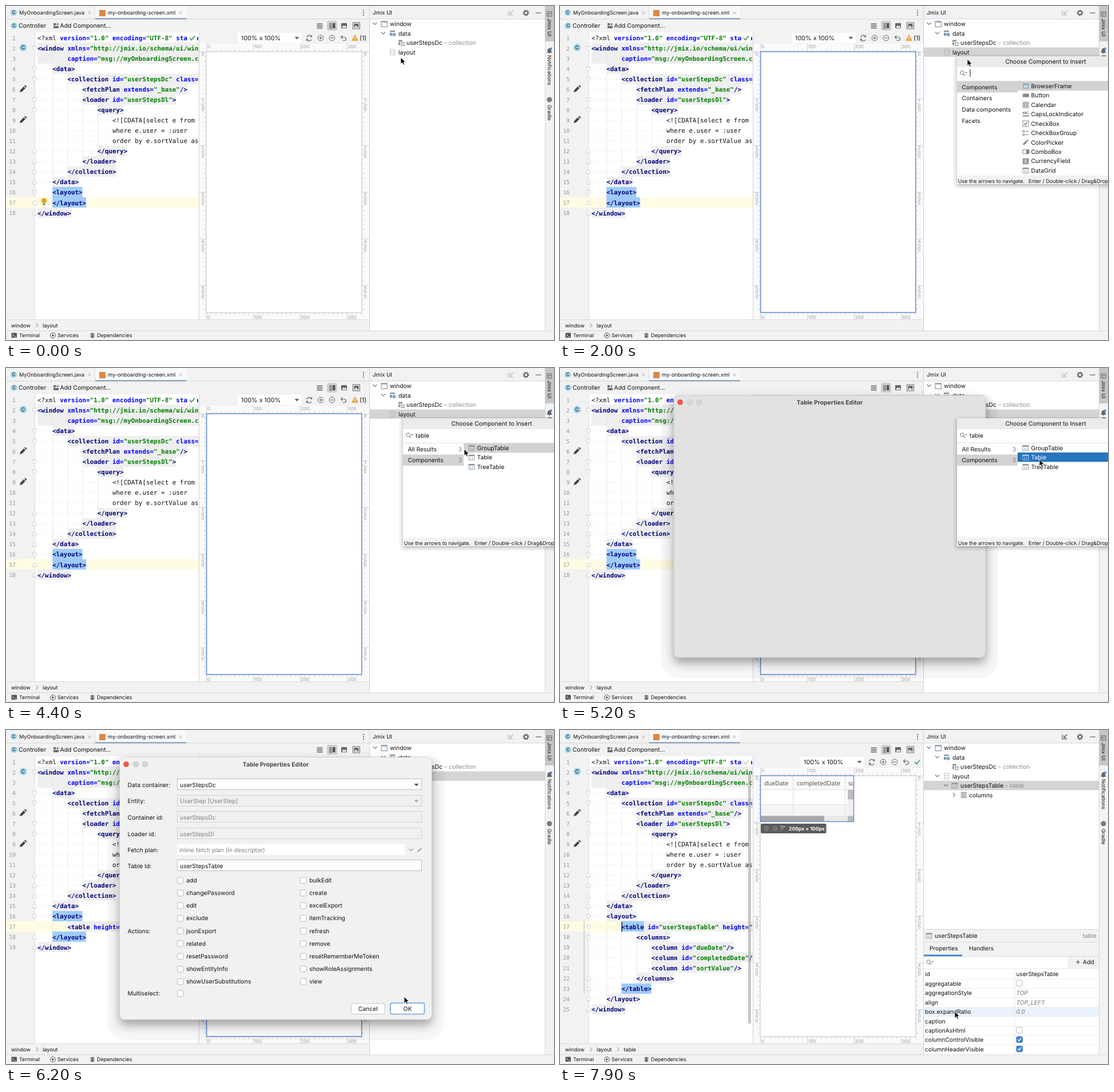
Recreate the animation shown at these times as an HTML page. Size 958 px wide and 585 px high, loop 8 s.

```html
<!DOCTYPE html>
<html lang="en">
<head>
<meta charset="utf-8">
<title>Screen designer</title>
<style>
html, body { margin: 0; width: 100%; height: 100%; overflow: hidden; background: #fff; }
svg { display: block; width: 100vw; height: 100vh; }
text { font-family: Inter, "Liberation Sans", sans-serif; fill: #111; white-space: pre; text-rendering: geometricPrecision; }
.code { font-family: "DejaVu Sans Mono", monospace; font-size: 10.88px; }
.b { font-weight: 700; }
.mid { text-anchor: middle; }
.end { text-anchor: end; }
.dim { fill: #808080; }
.white { fill: #fff; }
.it { font-style: italic; fill: #777; }
.tick { font-size: 8px; fill: #999; }
.web { font-family: "Open Sans", sans-serif; fill: #444; }
</style>
</head>
<body>
<svg id="stage" viewBox="0 0 958 585" xmlns="http://www.w3.org/2000/svg"></svg>
<script>
const LOOP = 8000, CH = 6.55, ROW = 18.05;
const esc = s => s.replace(/&/g, '&amp;').replace(/</g, '&lt;');
// y is the vertical middle of the capitals
const T = (x, y, s, size = 10.4, cls = '') =>
  `<text x="${x}" y="${y + size * 0.36}" font-size="${size}" class="${cls}">${esc(s)}</text>`;
const R = (x, y, w, h, fill, more = '') =>
  `<rect x="${x}" y="${y}" width="${w}" height="${h}" fill="${fill}" ${more}/>`;
const P = (d, stroke = '#6e6e6e', w = 1.2, fill = 'none') =>
  `<path d="${d}" stroke="${stroke}" stroke-width="${w}" fill="${fill}"/>`;
const C = (x, y, r, fill, more = '') => `<circle cx="${x}" cy="${y}" r="${r}" fill="${fill}" ${more}/>`;
const G = (id, s) => `<g id="${id}">${s}</g>`;
const at = (x, y, s) => `<g transform="translate(${x} ${y})">${s}</g>`;
const map = (list, f) => list.map(f).join('');
const range = n => [...Array(n).keys()];

// --- icons ---
const classIcon = (x, y, r) => C(x, y, r, '#9fd3ea') + T(x, y, 'C', r * 1.45, 'mid');
const chevron = (x, y, open = true, c = '#777') =>
  P(open ? `M${x - 3.5} ${y - 2}l3.5 3.5l3.5-3.5` : `M${x - 2} ${y - 3.5}l3.5 3.5l-3.5 3.5`, c, 1.1);
const cross = (x, y) => P(`M${x - 2.5} ${y - 2.5}l5 5m0-5l-5 5`, '#aaa', 0.9);
const lens = (x, y) => C(x, y, 3.3, 'none', 'stroke="#777"') + P(`M${x + 2.4} ${y + 2.4}l2.6 2.6`, '#777') +
  P(`M${x + 5} ${y - 1}h4l-2 2.2z`, 'none', 0, '#777');
const pencil = (x, y, c = '#444', k = 1) => `<g transform="translate(${x} ${y}) scale(${k})">` +
  P('M-6 6l1-4l6-6l3 3l-6 6zM2-5l1.6-1.6l3 3l-1.6 1.6z', 'none', 0, c) + '</g>';
const tableIcon = (x, y, c = '#8a969f') =>
  R(x - 5, y - 4.5, 10, 9, 'none', `stroke="${c}" stroke-width=".9"`) + R(x - 5, y - 4.5, 10, 2.2, c) +
  P(`M${x - 1.7} ${y - 0.5}v3.5m3.4-3.5v3.5`, c, 1);
const winIcon = (x, y) => R(x - 5, y - 5, 10.5, 10, '#fff', 'stroke="#7a8a99"') + R(x - 5, y - 5, 10.5, 2.5, '#9fb4c6');
const dataIcon = (x, y) => R(x - 5, y - 5, 9, 2.5, '#8a949c') + R(x - 5, y - 1, 4, 5, '#8a949c') + C(x + 2.5, y + 2, 3, '#7aa5c9');
const dcIcon = (x, y) => R(x - 5, y - 5, 7, 3, '#8a949c') + R(x - 5, y - 1, 3, 5, '#8a949c') +
  R(x, y, 5, 5, '#fff', 'stroke="#6e7a84"');
const dotted = (x, y) => R(x - 4, y - 5, 8, 10, 'none', 'stroke="#999" stroke-dasharray="1.5 1"') +
  P(`M${x - 4} ${y - 1.5}h8m-8 3.5h8`, '#bbb', 0.8);
const box = (x, y, on) => R(x - 5, y - 5, 10.5, 10.5, on ? '#3d7fd0' : '#fff', `rx="2" stroke="${on ? '#3d7fd0' : '#b8b8b8'}"`) +
  (on ? P(`M${x - 2.5} ${y}l2 2.5l3.8-5`, '#fff', 1.5) : '');

// --- code editor ---
const head = [
  '<?xml version="1.0" encoding="UTF-8" standalone="no"?>',
  '<window xmlns="http://jmix.io/schema/ui/window"',
  '        caption="msg://myOnboardingScreen.caption">',
  '    <data>',
  '        <collection id="userStepsDc" class="com.company.onboarding">',
  '            <fetchPlan extends="_base"/>',
  '            <loader id="userStepsDl">',
  '                <query>',
  '                    <![CDATA[select e from UserStep e',
  '                    where e.user = :user',
  '                    order by e.sortValue asc]]>',
  '                </query>',
  '            </loader>',
  '        </collection>',
  '    </data>',
  '    <layout>'];
const tail = ['    </layout>', '</window>'];
const shortTable = ['        <table height="100px" width="200px"/>'];
const fullTable = [
  '        <table id="userStepsTable" height="100px" width="200px">',
  '            <columns>',
  '                <column id="dueDate"/>',
  '                <column id="completedDate"/>',
  '                <column id="sortValue"/>',
  '            </columns>',
  '        </table>'];

const paint = s => s.replace(/"[^"]*"|[\w:]+=|[^"=]+?(?=\s|$)|\s+/g, m => {
  const c = m[0] === '"' ? '#008000' : m.endsWith('=') ? '#0000ff' : '#000080';
  return `<tspan fill="${c}">${esc(m)}</tspan>`;
});
const lineMid = i => 55.8 + ROW * i;
const lineTop = i => Math.round(lineMid(i) - 9.4);
const band = (x, i, w, fill) => R(x, lineTop(i), w, lineTop(i + 1) - lineTop(i), fill);
const foldDir = s => s.startsWith('</') ? -1 : /^<[a-z]/.test(s) && !s.endsWith('/>') ? 1 : 0;

function codeLine(line, i, marked) {
  const y = lineMid(i), s = line.trimStart(), n = line.length - s.length, x = 55 + n * CH;
  const plain = /^(<!|where|order)/.test(s), prolog = s.startsWith('<?'), tag = !plain && !prolog;
  let out = '';
  if (tag) {
    const x0 = s[0] === '<' ? x : 55;
    out += band(x0, i, x + s.length * CH - x0, '#efefef');
  }
  if (marked) out += band(x, i, s.match(/^<\/?\w+>?/)[0].length * CH, '#9fcbfa');
  if (n) out += `<path d="M57.7 ${y}H${x - 1}" stroke="#c4c4c4" stroke-dasharray="1 ${CH - 1}"/>`;
  for (let k = 4; k < n; k += 4) out += band(55 + k * CH, i, 0.8, '#e0e0e0');
  const body = plain ? esc(s) : prolog ? '&lt;?xml<tspan class="b">' + paint(s.slice(5)) + '</tspan>' : paint(s);
  return out + `<text class="code${tag ? ' b' : ''}" x="${x}" y="${y + 3.9}">${body}</text>`;
}

const foldMark = (dir, y) => dir ? at(50, y, `<path transform="scale(1 ${dir})" d="M-3-3.5h6v4.5l-3 2.8l-3-2.8z"
  fill="#fff" stroke="#c6c6c6" stroke-width=".9"/>`) : '';
const code = (lines, cur, marks) => band(0, cur - 1, 337, '#fffce3') +
  `<g clip-path="url(#editor)">${map(lines, (s, i) => codeLine(s, i, marks.includes(i + 1)))}</g>` +
  map(lines, (s, i) => `<text class="code end" x="17" y="${lineMid(i) + 3.7}" style="font-size:9.8px;fill:#999">${i + 1}</text>` +
    foldMark(foldDir(s.trim()), lineMid(i)));

// --- preview rulers ---
function rulers() {
  const U = 81.9, c = '#c4c4c4';
  let s = R(338, 66, 297, 483, '#fafafa') + R(350, 80, 272, 457, '#fff', `stroke="${c}"`);
  for (const k of range(34)) {
    const x = 350.5 + k * U / 10, big = k % 10 === 0;
    if (x > 622) continue;
    s += R(x, big ? 66 : 76, 0.8, big ? 14 : 4, c) + R(x, 537, 0.8, big ? 12 : 4, c);
    if (big) s += map([71, 545], y => T(x + 1.5, y, k * 10 + '', 8, 'tick'));
  }
  for (const k of range(56)) {
    const y = 80 + k * U / 10, big = k % 10 === 0;
    s += R(big ? 338 : 346, y, big ? 12 : 4, 0.8, c) + R(622, y, big ? 13 : 4, 0.8, c);
    if (big) s += map([344, 628], x => map([...(k * 10 + '')], (d, i) => T(x, y + 4.5 + i * 7.6, d, 8, 'tick mid')));
  }
  return s;
}

const zoomBar = (dx, status) => at(dx, 0,
  R(405, 47, 112, 18, '#fff') + T(411, 56, '100% x 100%', 10.8) + P('M504.5 54h8l-4 4.5z', 'none', 0, '#666') +
  P('M534 53.5a4.3 4.3 0 0 0-8 1.5m0 3a4.3 4.3 0 0 0 8 1M534.5 51v3h-3M525.5 61v-3h3', '#666') +
  map([550, 570], x => C(x, 56, 4.8, 'none', 'stroke="#666"') + P(`M${x - 2.5} 56h5`, '#666')) + P('M550 53.5v5', '#666') +
  P('M588.5 51.5l-3 3l3 3M586 54.5h5.5a2.8 2.8 0 0 1 0 6h-3', '#666')) + status;

// --- window chrome ---
const stripe = (y, s) => `<g transform="translate(950 ${y}) rotate(90)">${T(0, 0, s, 8.9)}</g>`;
const chrome =
  R(0, 0, 958, 585, '#f2f2f2') + R(50, 46, 287, 503, '#fff') + R(50, 46, 0.8, 503, '#d8d8d8') +
  R(636, 23, 306, 526, '#fff') + R(636, 549, 306, 20, '#fff') +
  R(0, 22.5, 942, 0.8, '#d0d0d0') + R(156, 0, 159, 23, '#f8f9fb') + R(156, 21, 159, 2.5, '#94a8c2') +
  R(155, 0, 0.8, 22, '#d8d8d8') +
  classIcon(13.5, 11.5, 5.6) + T(23, 12, 'MyOnboardingScreen.java', 9.1) + cross(146, 12) +
  R(163, 7, 11, 11, '#dd8748') + T(178, 12, 'my-onboarding-screen.xml', 9.2) + cross(305, 12) +
  map([8, 12, 16], y => C(625, y, 1.1, '#555')) +
  classIcon(14, 34.5, 5.6) + T(22, 34.5, 'Controller') +
  R(83, 35, 9, 4, '#6e6e6e') + R(83, 30, 4, 4, '#6e6e6e') + P('M90 29.5v5m-2.5-2.5h5') + T(94.5, 34.5, 'Add Component...') +
  map([0, 1, 2, 3], i => R(543.5, 30.5 + i * 2.6, 10, 1.2, '#555')) +
  R(561, 26, 18, 17, '#cfcfcf', 'rx="3"') + map([0, 1, 2, 3], i => R(565, 30.5 + i * 2.6, 5, 1.2, '#555')) + R(571, 30, 4.5, 9, '#555') +
  R(586, 30, 10, 9, '#666') + P('M587 38l3-4l2 2l1.5-2l2 4z', 'none', 0, '#fff') +
  R(606.5, 29, 12, 11, 'none', 'stroke="#666"') + R(608.5, 31, 8, 7, '#666') + P('M609 37.5l2.5-3l2 1.5l2.5 1.5z', 'none', 0, '#fff') +
  rulers() + R(337, 46, 0.9, 503, '#cfcfcf') + R(635, 0, 0.9, 569, '#cfcfcf') +
  T(641, 12, 'Jmix UI', 9.6) +
  C(909, 12, 3.2, 'none', 'stroke="#666" stroke-width="2"') + C(909, 12, 4.8, 'none', 'stroke="#666" stroke-width="1.4" stroke-dasharray="1.9 1.87"') +
  R(926, 11.5, 10, 1.2, '#666') +
  R(942, 0, 0.8, 569, '#d0d0d0') + R(942.5, 0, 15.5, 62, '#c6c6c6') +
  R(946, 10, 8, 8, 'none', 'stroke="#666"') + P('M946 13h8m-5 0v5', '#666', 1) + stripe(22, 'Jmix UI') +
  P('M946 81.5c2-2 0-7 4-7s2 5 4 7zM949 83h2', '#666', 1, '#666') + C(953, 74.5, 2, '#4a8fd6') + stripe(86, 'Notifications') +
  C(950, 164, 4.5, '#707a80') + stripe(173, 'Gradle') +
  R(0, 549, 635, 0.8, '#d4d4d4') + T(9, 559.5, 'window', 9.2) + chevron(54.5, 559.5, false, '#aaa') + T(64, 559.5, 'layout', 9.3) +
  R(0, 568.5, 958, 0.8, '#cfcfcf') + R(9.5, 572.5, 9.5, 8.5, '#555', 'rx="1"') + P('M11.5 575l2 1.7l-2 1.7m3 .8h3', '#fff', 0.9) +
  T(23, 577, 'Terminal', 8.95) + C(82, 577, 4.5, 'none', 'stroke="#555"') + P('M80.5 574.5l4 2.5l-4 2.5z', 'none', 0, '#555') +
  T(90, 577, 'Services', 9.05) + map([0, 2.5, 5], d => P(`M146.5 ${574.5 + d}l4.5 2.2l4.5-2.2l-4.5-2.2z`, '#f2f2f2', 0.6, '#555')) +
  T(159, 577, 'Dependencies', 9.05);

const gutter = classIcon(30, 72.7, 6.4) + pencil(30, 145) + pencil(30, 199);

// --- component tree ---
const noted = (x, y, s, note) =>
  `<text x="${x}" y="${y + 3.75}" font-size="10.4">${s}<tspan fill="#8c8c8c"> – ${note}</tspan></text>`;
const tree = chevron(645, 31) + winIcon(661, 31.5) + T(671, 31.5, 'window') +
  chevron(659.5, 47.5) + dataIcon(676, 48) + T(686, 48, 'data') +
  dcIcon(691, 64.5) + noted(700, 64.5, 'userStepsDc', 'collection') + dotted(676, 81) + T(686, 81, 'layout');
const arrow = c => P('M887 7.5l-6 6m0-4.5v5h5M878 8v8h8', c, 1.1);

const props = [['id', 'userStepsTable'], ['aggregatable', 0], ['aggregationStyle', 'TOP'], ['align', 'TOP_LEFT'],
  ['box.expandRatio', '0.0'], ['caption', ''], ['captionAsHtml', 0], ['columnControlVisible', 1], ['columnHeaderVisible', 1]];
const inspector = R(636, 349, 306, 219.5, '#f2f2f2') + R(636, 349, 306, 0.8, '#cfcfcf') +
  tableIcon(645, 360.5) + T(655, 360.5, 'userStepsTable', 10.3) + T(938, 360.5, 'table', 10.3, 'end dim') +
  R(636, 371, 306, 0.8, '#d6d6d6') + T(646, 382.5, 'Properties', 10.2) + T(715, 382.5, 'Handlers', 10.2) +
  R(636, 396, 306, 0.8, '#d6d6d6') + R(636, 393.5, 67, 2.8, '#4083c9') +
  R(636, 397, 251, 20, '#fff') + lens(644, 406) + P('M902 406.5h7m-3.5-3.5v7', '#555') + T(914, 406.5, 'Add') +
  R(636, 419, 306, 149.5, '#fff') +
  map(props, ([k, v], i) => {
    const y = 427.7 + i * 16.43;
    return (i === 4 ? R(636, y - 8, 306, 16.4, '#eaf3fc') : '') + R(636, y + 8, 306, 0.7, '#e6e6e6') + T(638, y, k, 10.2) +
      (typeof v === 'number' ? box(803, y - 0.8, v) : T(797.5, y, v, 10.2, i ? 'it' : ''));
  }) + R(794.5, 419, 0.8, 149.5, '#e2e2e2');

const newNode = chevron(659.5, 80.5) + R(636, 89, 306, 16.4, '#d4d4d4') + chevron(674.5, 97) + tableIcon(690, 97.5) +
  noted(700, 97.5, 'userStepsTable', 'table') + chevron(689, 113.5, false) +
  map([702, 705.3, 708.6], x => R(x - 0.5, 109.5, 2.2, 9, 'none', 'stroke="#7a848c" stroke-width=".9"')) + T(715, 114, 'columns');

const rendered = R(351, 80, 162, 80, '#fff') + R(351, 80, 162, 24, '#fafafa') + R(351, 130, 152, 20, '#f5f5f5') +
  T(357, 93, 'dueDate', 10.6, 'web') + T(414, 93, 'completedDate', 10.6, 'web') + T(504, 93, 'sc', 10.6, 'web') +
  R(513, 82, 14, 20, '#fff') + R(351, 104, 162, 0.8, '#d8d8d8') + R(351, 130, 152, 0.8, '#dedede') +
  R(407, 80, 0.8, 70, '#d8d8d8') + R(498, 80, 0.8, 70, '#d8d8d8') +
  R(503, 104, 10, 46, '#f1f1f1') + R(503, 104.5, 10, 17, '#bcbcbc') +
  R(351, 150, 162, 10, '#e8e8e8') + R(351, 150.5, 111, 9.5, '#a8a8a8') + R(503, 150.5, 10, 9.5, '#bcbcbc') +
  R(350.5, 80, 163, 80.5, 'none', 'stroke="#5b8fd6" stroke-width="1.4"') +
  R(351, 164, 114.5, 17, '#5d5b5c', 'rx="2"') + map([361, 376], x => C(x, 172.5, 4.5, '#777')) + P('M358.5 172.5h5m12.5-2.5v5', '#555') +
  R(385, 168, 9, 2.5, '#999') + R(385, 172, 6, 2, '#888') + R(385, 175.5, 2, 2, '#888') + T(400, 172.5, '200px × 100px', 8.6, 'white b');

// --- component chooser ---
const names = ['BrowserFrame', 'Button', 'Calendar', 'CapsLockIndicator', 'CheckBox', 'CheckBoxGroup', 'ColorPicker',
  'ComboBox', 'CurrencyField', 'DataGrid'];
const frameIcon = (x, y) => R(x - 5, y - 4.5, 10, 9, '#9aa5ad') + R(x - 3.5, y - 1.5, 7, 4.5, '#c9dcea');
const calIcon = (x, y) => map(range(9), i => R(x - 5 + i % 3 * 3.8, y - 5 + (i / 3 | 0) * 3.8, 2.7, 2.7, 'none', 'stroke="#888" stroke-width=".8"'));
const listIcons = [frameIcon, (x, y) => R(x - 5, y - 3, 11, 6, '#7d8a94'), calIcon,
  (x, y) => T(x, y - 2, 'ABC', 5.2, 'mid') + R(x - 5, y + 2, 11, 2, '#888'),
  (x, y) => R(x - 5, y - 5, 10, 10, '#fff', 'stroke="#888"') + P(`M${x - 2.5} ${y}l2 2.5l3.5-5`, '#666'),
  (x, y) => map([-3.5, 2.5], d => R(x - 5, y + d - 1, 3, 3, 'none', 'stroke="#888"') + R(x, y + d, 5, 1.2, '#888')),
  (x, y) => pencil(x, y, '#888', 0.8),
  (x, y) => R(x - 5, y - 3.5, 11, 7, '#fff', 'stroke="#888"') + R(x + 1, y - 3.5, 5, 7, '#888'),
  (x, y) => R(x - 5, y - 5, 10.5, 10.5, '#8a949c') + T(x, y, '$', 8.5, 'mid white'), tableIcon];
const rowY = i => 140.2 + i * 16.43;
const rows = (list, sel, blue) => R(800, Math.round(rowY(sel) - 8.6), 158, 16.4, blue ? '#2675bf' : '#d2d2d2') +
  map(list, (s, i) => (list === names ? listIcons[i] : tableIcon)(814, rowY(i), i === sel && blue ? '#a9cdf0' : undefined) +
    T(823.5, rowY(i), s, 10.35, i === sel && blue ? 'white' : ''));
const cats = (list, sel) => R(694, 132 + sel * 19.6, 106, 19.4, '#d2d2d2') + map(list, (s, i) => T(702.5, 141.8 + i * 19.7, s, 10.3));
const hits = ['GroupTable', 'Table', 'TreeTable'];
const popup = R(687, 86, 290, 234, '#000', 'rx="10" opacity=".03"') + R(694, 88, 280, 224, '#fff', 'filter="url(#soft)"') + R(694, 88, 264, 19, '#ebebeb') +
  T(849, 97.5, 'Choose Component to Insert', 10.4, 'mid') + lens(703, 117) + R(694, 131, 264, 0.8, '#d6d6d6') +
  T(716, 118, '', 10.3).replace('<text', '<text id="query"') + G('caret', R(716.5, 111, 1, 13, '#111')) +
  G('catsAll', cats(['Components', 'Containers', 'Data components', 'Facets'], 0)) +
  G('catsHit', cats(['All Results', 'Components'], 1)) + G('catsData', T(702.5, 181.2, 'Data components', 10.3)) +
  G('counts', T(797, 141.8, '3', 10.3, 'end dim') + T(797, 161.5, '3', 10.3, 'end dim')) +
  G('listAll', rows(names, 0)) + G('listHit', rows(hits, 0)) + G('listPick', rows(hits, 1, true)) +
  R(694, 297, 264, 15, '#f2f2f2') + T(695.7, 306.3, 'Use the arrows to navigate.', 9) + T(819, 306.3, 'Enter / Double-click / Drag&Drop to insert', 9);

// --- properties dialog ---
const fields = [['Data container:', 'userStepsDc', 96], ['Entity:', 'UserStep [UserStep]', 124.5], ['Container id:', 'userStepsDc', 153],
  ['Loader id:', 'userStepsDl', 182], ['Fetch plan:', 'inline fetch plan (in descriptor)', 210], ['Table Id:', 'userStepsTable', 238]];
const actions = ['add', 'bulkEdit', 'changePassword', 'create', 'edit', 'excelExport', 'exclude', 'itemTracking', 'jsonExport', 'refresh',
  'related', 'remove', 'resetPassword', 'resetRememberMeToken', 'showEntityInfo', 'showRoleAssignments', 'showUserSubstitutions', 'view'];
const field = ([label, value, y], i) => {
  const on = i % 5 === 0, plan = i === 4, top = Math.floor(y - 9.5) - 0.5;
  return T(212.5, y, label) + R(299.5, top, plan ? 398 : 427, 19, on || plan ? '#fff' : '#f0f0f0', plan ? '' : `stroke="${on ? '#bdbdbd' : '#d0d0d0'}"`) +
    T(plan ? 303 : 304, y, value, 10.4, on ? '' : 'dim') + (i < 2 ? P(`M713.5 ${y - 2}h8l-4 4.5z`, 'none', 0, i ? '#aaa' : '#555') : '');
};
const form = R(199, 48, 545, 459, '#f1f1f1', 'rx="8"') + map(fields, field) + chevron(708, 210, true, '#999') + pencil(723, 210, '#aaa', 0.65) +
  T(212.5, 352, 'Actions:') +
  map(actions, (s, i) => {
    const x = i % 2 ? 519.5 : 304.5, y = 263.2 + (i >> 1) * 22.17;
    return box(x, y, 0) + T(x + 10.7, y, s);
  }) + T(212.5, 461.5, 'Multiselect:') + box(304.5, 461.2, 0) +
  R(603.5, 479, 58.5, 18.5, '#fff', 'rx="3" stroke="#c4c4c4"') + T(632.7, 488.5, 'Cancel', 10.4, 'mid') +
  R(672, 478.3, 59.5, 19.3, '#fff', 'rx="3" stroke="#82aee8" stroke-width="1.9"') + T(702, 488.5, 'OK', 10.4, 'mid');
const dialog = R(177, 46, 589, 497, '#000', 'rx="30" opacity=".03"') +
  R(199, 48, 545, 459, '#e2e2e2', 'rx="8" stroke="#bbb" stroke-width=".8" filter="url(#deep)"') + G('form', form) +
  C(210, 60, 4.9, '#f2564d') + map([227, 243], x => C(x, 60, 4.9, '#d6d6d6', 'stroke="#c2c2c2" stroke-width=".7"')) +
  T(471.5, 59.8, 'Table Properties Editor', 10.4, 'mid b').replace('<text', '<text fill-opacity=".75"');

const shadow = (id, dy, r, a) => `<filter id="${id}" x="-20%" y="-20%" width="140%" height="140%">
  <feDropShadow dx="0" dy="${dy}" stdDeviation="${r}" flood-opacity="${a}"/></filter>`;
const pick = id => document.getElementById(id);

pick('stage').innerHTML = `<defs>${shadow('soft', 2, 3, 0.3)}${shadow('deep', 9, 9, 0.36)}
  <clipPath id="editor">${R(50, 46, 287, 503, '#000')}</clipPath></defs>` + chrome +
  G('codeA', code([...head, ...tail], 17, [16, 17])) +
  G('codeB', code([...head, ...shortTable, ...tail], 17, [16, 18])) +
  G('codeC', code([...head, ...fullTable, ...tail], 17, [17, 23]) + R(107.5, 336, 1.3, 17, '#000') +
    R(329, 78, 5, 436, '#999', 'rx="1" opacity=".55"')) +
  G('change', R(41.5, 335.5, 1.2, 126, '#a9bfd6')) + gutter +
  G('crumb', chevron(102, 559.5, false, '#aaa') + T(111.5, 559.5, 'table', 9.2)) +
  G('bulb', C(66.5, 341, 4.6, '#eda21c') + R(64.5, 346, 4, 2.4, '#777')) +
  R(318, 49, 16, 14, '#fff') + P('M321 56l3.2 3.5l6-7', '#59a869', 2) + G('fade', R(318, 49, 16, 14, '#fff', 'opacity=".6"')) +
  G('zoomA', zoomBar(0, P('M610 50.5l5.5 10h-11z', '#e9a33b', 1, '#efae4c') + R(609.5, 54, 1.1, 3.2, '#fff') + T(618, 56, '(1)', 10.8))) +
  G('zoomB', zoomBar(15, P('M620.5 56l3 3.5l5.5-7', '#59a869', 2))) +
  G('frame', R(350.7, 80, 271, 456.7, 'none', 'stroke="#6a97dc" stroke-width="1.6"')) + G('rendered', rendered) +
  G('selected', R(636, 72.5, 306, 16.4, '#d4d4d4')) + tree + G('arrowOff', arrow('#bbb')) + G('arrowOn', arrow('#555')) +
  G('node', newNode + inspector) + G('dialog', dialog) + G('popup', popup) +
  G('cursor', '<path d="M0 0V11.6L2.7 9.2L4.6 13.3L6.6 12.4L4.8 8.4H8.4Z" fill="#000" stroke="#fff" stroke-width=".9"/>');

// part, first ms, end ms
const cues = [
  ['codeA', 0, 5400], ['codeB', 5400, 7200], ['codeC', 7200, LOOP], ['crumb', 7200, LOOP], ['node', 7200, LOOP],
  ['change', 7300, LOOP], ['fade', 7400, LOOP], ['bulb', 0, 1400], ['selected', 500, 7200], ['frame', 500, 7400],
  ['zoomA', 0, 7400], ['zoomB', 7400, LOOP], ['rendered', 7400, LOOP], ['arrowOff', 0, 7400], ['arrowOn', 7400, LOOP],
  ['popup', 1400, 5400], ['catsAll', 0, 2900], ['catsHit', 2900, LOOP], ['catsData', 2900, 3500], ['counts', 3500, LOOP],
  ['listAll', 0, 3300], ['listHit', 3300, 4800], ['listPick', 4800, LOOP], ['dialog', 5100, 6800], ['form', 5500, LOOP]
].map(([id, a, b]) => [pick(id), a, b]);
const typed = [[2900, 't'], [3000, 'ta'], [3300, 'tab'], [3500, 'tabl'], [3700, 'table']];
const path = [[0, 690, 90], [400, 700, 84], [1100, 704, 84], [1500, 712, 93], [3900, 712, 93], [4400, 801, 142], [4700, 838, 160],
  [5500, 838, 160], [6200, 696, 467], [6500, 697, 483], [6900, 690, 493], [LOOP, 690, 493]];
const cursor = pick('cursor'), query = pick('query'), caret = pick('caret');

function render(t) {
  for (const [node, a, b] of cues) node.style.display = t >= a && t < b ? '' : 'none';
  const text = typed.reduce((s, [from, q]) => t >= from ? q : s, '');
  if (query.textContent !== text) query.textContent = text;
  caret.style.display = !text && t % 1000 < 500 ? '' : 'none';
  const i = path.findIndex(p => p[0] > t);
  const [t0, x0, y0] = path[i - 1], [t1, x1, y1] = path[i];
  const u = (t - t0) / (t1 - t0), k = u * u * (3 - 2 * u);
  cursor.setAttribute('transform', `translate(${x0 + (x1 - x0) * k} ${y0 + (y1 - y0) * k})`);
}

const start = performance.now();
(function tick() {
  render((performance.now() - start) % LOOP);
  requestAnimationFrame(tick);
})();
</script>
</body>
</html>
```
